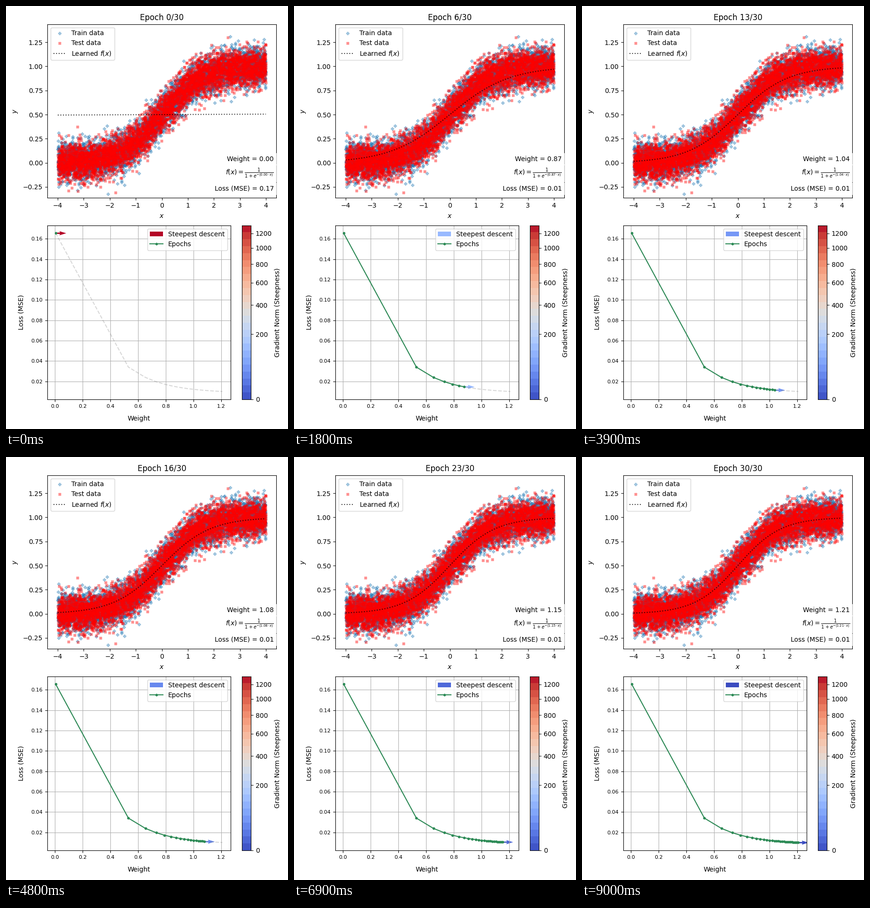
A matplotlib script that plays this animation: 600x900 px, repeating every 9.3 s.

```python
import numpy as np
import matplotlib.pyplot as plt
from matplotlib.animation import FuncAnimation
from matplotlib.patches import Patch

W, H = 600, 900
EPOCHS = 30
SLOPE, NOISE, POINTS = 1.3, 0.1, 5000
GRAD_MIN, GRAD_MAX = 17.7, 1316

# One big first step, then ever smaller ones
epochs = np.arange(EPOCHS + 1)
late = epochs[1:] - 1
weights = np.r_[0.0048, 0.53 + 0.2265 * np.log(1 + 0.73 * late) - 0.0008 * late]
losses = np.r_[0.1655, 0.0085 + 0.0255 * np.exp(-4.107 * (weights[1:] - 0.53))]
steepness = np.r_[1, 0.46 * (1 - (epochs[1:] / EPOCHS) ** 0.6)]


def sigmoid(x):
    return 1 / (1 + np.exp(-x))


def grad_norm(g):
    return np.sqrt(np.clip((g - GRAD_MIN) / (GRAD_MAX - GRAD_MIN), 0, 1))


def box(left, top, right, bottom):
    return [left / W, 1 - bottom / H, (right - left) / W, (bottom - top) / H]


rng = np.random.default_rng(4)


def sample():
    x = rng.uniform(-4, 4, POINTS)
    return x, sigmoid(SLOPE * x) + rng.normal(0, NOISE, POINTS)


fig = plt.figure(figsize=(W / 100, H / 100), dpi=100)

# Data and fitted curve
top = fig.add_axes(box(88, 38.6, 575, 408))
top.set_xlim(-4.4, 4.4)
top.set_ylim(-0.3625, 1.438)
for marker, color, name in (("P", "tab:blue", "Train data"), ("X", "red", "Test data")):
    top.scatter(*sample(), s=16, lw=1, marker=marker, color=color, alpha=0.33, label=name)
xs = np.linspace(-4, 4, 200)
curve, = top.plot(xs, xs, ":", color="black", alpha=0.75, label="Learned $f(x)$")
top.legend(loc="upper left")
top.set_xlabel("$x$", labelpad=6)
top.set_ylabel("$y$", labelpad=6)
title = top.set_title("")


def note(y):
    return fig.text(570 / W, 1 - y / H, "", ha="right", va="baseline",
                    bbox=dict(facecolor="white", edgecolor="none", alpha=0.75))


weight_note, formula_note, loss_note = note(330), note(359), note(393)

# Loss against weight
low = fig.add_axes(box(88, 466.6, 478, 837))
for set_lim, v in ((low.set_xlim, weights), (low.set_ylim, losses)):
    pad = 0.05 * np.ptp(v)
    set_lim(v.min() - pad, v.max() + pad)
low.grid(True)
low.tick_params(labelsize=8)
low.plot(weights, losses, "--", color="gray", alpha=0.3)
trail, = low.plot([], [], ".-", color="seagreen", label="Epochs")
arrow = low.quiver([0], [0], [1], [0], scale=18)
legend = low.legend(handles=[Patch(lw=0, label="Steepest descent"), trail],
                    loc="upper right")
swatch = legend.get_patches()[0]
low.set_xlabel("Weight", labelpad=10)
low.set_ylabel("Loss (MSE)", labelpad=10)

# Steepness scale
bar = fig.add_axes(box(502.1, 466.6, 521, 837))
bands = np.linspace(0, 1, 26)
bar.pcolormesh([0, 1], bands, (bands[:-1, None] + bands[1:, None]) / 2,
               cmap="coolwarm", vmin=0, vmax=1)
ticks = np.arange(0, 1201, 200)
bar.set_xticks([])
bar.yaxis.tick_right()
bar.yaxis.set_label_position("right")
bar.set_yticks(grad_norm(ticks), ticks)
bar.set_ylim(0, 1)
bar.set_ylabel("Gradient Norm (Steepness)")


def update(i):
    w, loss = weights[i], losses[i]
    color = plt.cm.coolwarm(steepness[i])
    title.set_text(f"Epoch {i}/{EPOCHS}")
    curve.set_ydata(sigmoid(w * xs))
    weight_note.set_text(f"Weight = {w:.2f}")
    formula_note.set_text(rf"$f(x) = \frac{{1}}{{1 + e^{{-({w:.2f} \cdot x)}}}}$")
    loss_note.set_text(f"Loss (MSE) = {loss:.2f}")
    trail.set_data(weights[:i + 1], losses[:i + 1])
    arrow.set_offsets([[w, loss]])
    arrow.set_color(color)
    swatch.set_facecolor(color)
    return []


anim = FuncAnimation(fig, update, frames=EPOCHS + 1, interval=300,
                     repeat=True, repeat_delay=0, blit=False)
plt.show()
```
